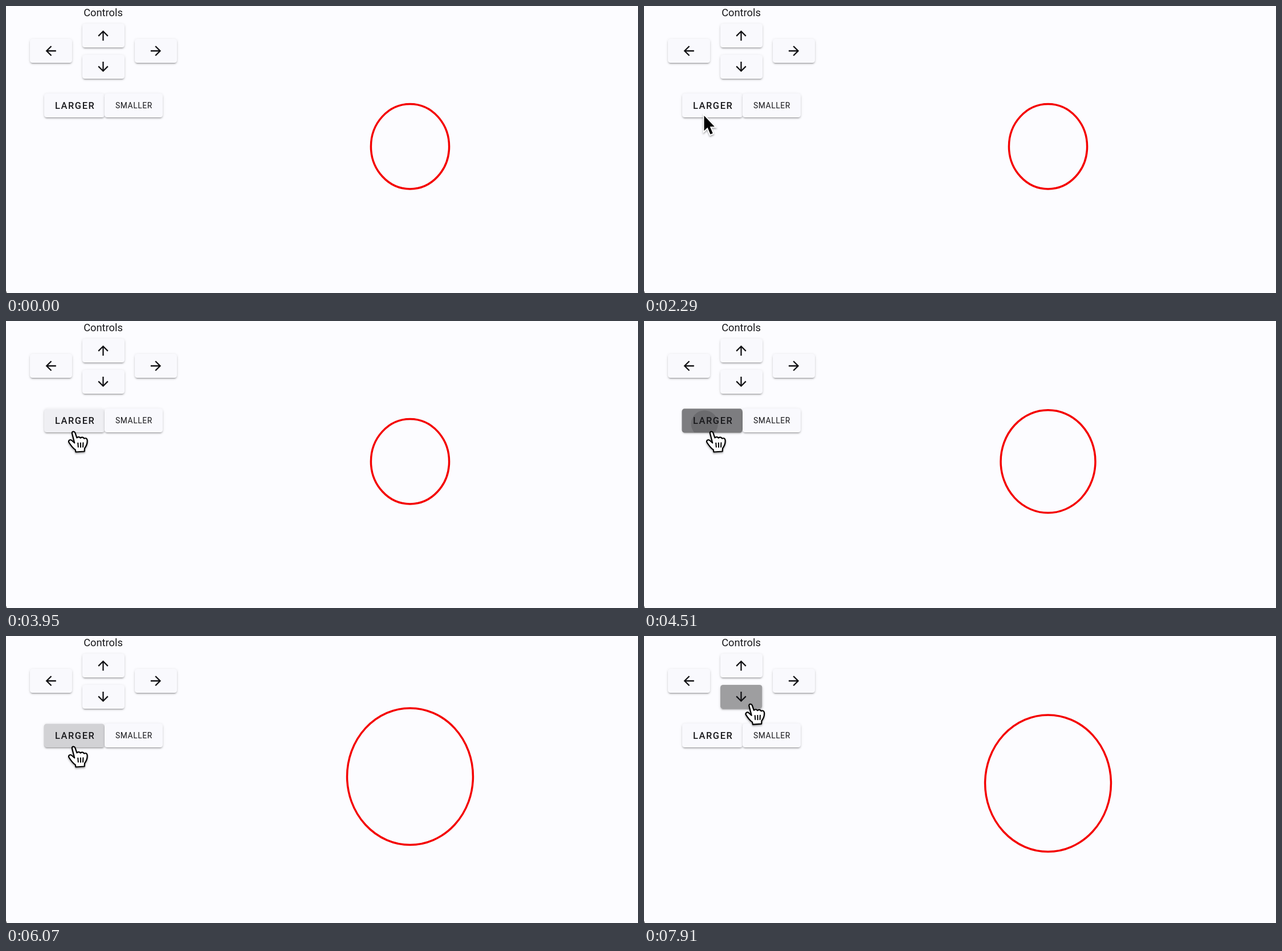
Animation of 1109 by 505 pixels, one loop 8000 ms. Source, as an HTML page:

```html
<!DOCTYPE html>
<html lang="en">
<head>
<meta charset="utf-8">
<title>Circle controls</title>
<style>
html, body { margin: 0; width: 100%; height: 100%; overflow: hidden; background: #fcfcff; }
#stage { position: absolute; left: 0; top: 0; width: 1109px; height: 505px; overflow: hidden; }
.btn {
  position: absolute; height: 42px; border-radius: 4.6px; background: #f9f9fd;
  box-shadow: 0 3.4px 1.1px -2.3px rgba(0,0,0,.2), 0 2.3px 2.3px rgba(0,0,0,.14), 0 1.1px 5.7px rgba(0,0,0,.12);
}
svg { position: absolute; left: 0; top: 0; }
text { font-family: Roboto, sans-serif; fill: #18181b; }
.cursor { filter: drop-shadow(0 2px 1.5px rgba(0,0,0,.35)); }
</style>
</head>
<body>
<div id="stage"></div>
<script>
const LOOP = 8000;
const stage = document.getElementById('stage');
const NS = 'http://www.w3.org/2000/svg';

function el(tag, attrs, parent) {
  const node = document.createElementNS(NS, tag);
  set(node, attrs);
  parent.appendChild(node);
  return node;
}
function set(node, attrs) {
  for (const key in attrs) node.setAttribute(key, attrs[key]);
}
const clamp = v => Math.max(0, Math.min(1, v));
const mix = (a, b, p) => a + (b - a) * p;
const smooth = p => p * p * (3 - 2 * p);

// cubic-bezier(0, 0, .2, 1)
function decelerate(x) {
  let lo = 0, hi = 1;
  for (let i = 0; i < 20; i++) {
    const s = (lo + hi) / 2;
    if (.6 * (1 - s) * s * s + s * s * s < x) lo = s; else hi = s;
  }
  return 3 * (1 - lo) * lo * lo + lo ** 3;
}

// Buttons: x, y, width
const boxes = {
  left: [42, 58, 74], up: [134, 31, 73.5], down: [134, 86, 73.5],
  right: [226.3, 58, 74], larger: [66.5, 154.3, 106.5], smaller: [173, 154.3, 102]
};
for (const [x, y, w] of Object.values(boxes)) {
  const div = document.createElement('div');
  div.className = 'btn';
  div.style.cssText = `left:${x}px;top:${y}px;width:${w}px`;
  stage.appendChild(div);
}

const svg = el('svg', { width: 1109, height: 505, viewBox: '0 0 1109 505' }, stage);
const defs = el('defs', {}, svg);

function overlay(name) {
  const [x, y, w] = boxes[name];
  const shape = { x, y, width: w, height: 42, rx: 4.6 };
  const clip = el('clipPath', { id: 'clip-' + name }, defs);
  el('rect', shape, clip);
  const group = el('g', { 'clip-path': `url(#clip-${name})` }, svg);
  return {
    group,
    focus: el('rect', { ...shape, opacity: 0 }, group),
    hover: el('rect', { ...shape, opacity: 0 }, group)
  };
}
const larger = overlay('larger');
const down = overlay('down');

// Each press: owner, box, start, release, pointer position
const presses = [
  [larger, 'larger', 4010, 4110, 103.6, 182],
  [larger, 'larger', 4230, 4340, 103.6, 182],
  [larger, 'larger', 4494, 4590, 103.6, 182],
  [larger, 'larger', 4880, 4990, 103.6, 182],
  [larger, 'larger', 5172, 5390, 103.6, 182],
  [down, 'down', 7530, 7640, 174, 110]
].map(([owner, name, start, release, x, y]) => {
  const [bx, by, w] = boxes[name];
  return {
    name, start, release, x, y,
    cx: bx + w / 2, cy: by + 21, r: Math.hypot(w, 42) / 2,
    node: el('circle', { opacity: 0 }, owner.group)
  };
});

const ARROW = 'M20 11V13H8L13.5 18.5L12.08 19.92L4.16 12L12.08 4.08L13.5 5.5L8 11Z';
[['left', 0], ['up', 90], ['right', 180], ['down', 270]].forEach(([name, turn]) => {
  const [x, y, w] = boxes[name];
  el('path', {
    d: ARROW, fill: '#111114',
    transform: `translate(${x + w / 2 - .3} ${y + 21}) rotate(${turn}) scale(1.15) translate(-12.08 -12)`
  }, svg);
});

function label(str, attrs) {
  el('text', attrs, svg).textContent = str;
}
label('Controls', { x: 170.5, y: 18.4, 'font-size': 18.3, 'text-anchor': 'middle' });
label('LARGER', { x: 85.9, y: 181, 'font-size': 16.4, 'font-weight': 500, 'letter-spacing': 1.6 });
label('SMALLER', { x: 192, y: 180, 'font-size': 13.8, 'letter-spacing': .6 });
el('path', { d: 'M0 501Q1 503 1.5 505H0Z', fill: '#555' }, svg);

const ring = el('ellipse', { cx: 709, cy: 247, fill: 'none', stroke: '#f40000', 'stroke-width': 3.5 }, svg);

const pointer = el('path', {
  class: 'cursor', d: 'M0 0V26.5L6 20.8L11 32.8L15.2 31L10.2 19.3H18.3Z',
  fill: '#000', stroke: '#fff', 'stroke-width': 4, 'paint-order': 'stroke'
}, svg);

const hand = el('g', { class: 'cursor' }, svg);
el('path', {
  d: 'M-2 2.5C-3 -1.5 2 -2 3.2 1.2L6.3 10C8 8 11 8 12.6 10.3C15 8.3 18 9 19 11.3C22 10 24 11 24.5 14C25.2 20 23 24.5 20 28.5L19.6 34L4.5 35L3.6 31C-1 28 -4.5 23 -7.6 18C-9.2 14.5 -5 12 -2.4 14.8L2.2 19Z',
  fill: '#fff', stroke: '#000', 'stroke-width': 2.2, 'stroke-linejoin': 'round'
}, hand);
el('path', { d: 'M8.2 18.5L8.8 27M12.8 18.2L13 27.3M17.4 18L17 27', stroke: '#000', 'stroke-width': 2, fill: 'none' }, hand);

// Pointer stops: time, x, y
const route = [
  [420, 846, 498], [1010, 447, 212], [1590, 447, 212], [1710, 440.8, 208.5],
  [2310, 104.5, 193], [2410, 104.5, 193], [3150, 110.5, 187.5], [3670, 110.5, 187.5],
  [3750, 118, 195.5], [6240, 118, 195.5], [6790, 179.8, 129.7], [7110, 186.5, 120.7]
];
function position(t) {
  let i = 0;
  while (i < route.length - 1 && t >= route[i + 1][0]) i++;
  const a = route[i], b = route[i + 1] || a;
  const p = b === a ? 0 : smooth(clamp((t - a[0]) / (b[0] - a[0])));
  return [mix(a[1], b[1], p), mix(a[2], b[2], p)];
}

function drawRipple(press, t) {
  const age = t - press.start;
  if (age < 0) return set(press.node, { opacity: 0 });
  const p = decelerate(clamp(age / 375));
  const fadeAt = Math.max(420, press.release - press.start);
  const alpha = mix(.14, .25, clamp((age - 180) / 80)) * (1 - clamp((age - fadeAt) / 450));
  set(press.node, {
    cx: mix(press.x, press.cx, p), cy: mix(press.y, press.cy, p),
    r: press.r * mix(.3, 1, p), opacity: alpha
  });
}

function fade(t, from, to) {
  return clamp((t - from) / 150) * (1 - clamp((t - to) / 150));
}

function draw(t) {
  presses.forEach(press => drawRipple(press, t));
  const done = name => presses.filter(p => p.name === name && t >= p.release).length;
  const scale = 1.1 ** done('larger');
  set(ring, { rx: 68.6 * scale, ry: 74.7 * scale, cy: 247.2 + 12 * done('down') });

  set(larger.focus, { opacity: .12 * fade(t, 4010, 7530) });
  set(larger.hover, { opacity: .04 * fade(t, 3700, 6450) });
  set(down.focus, { opacity: .12 * fade(t, 7530, LOOP) });
  set(down.hover, { opacity: .04 * fade(t, 6900, LOOP) });

  const [x, y] = position(t);
  const place = `translate(${x} ${y})`;
  const isHand = t >= 3710;
  set(pointer, { transform: place, visibility: t >= 420 && !isHand ? 'visible' : 'hidden' });
  set(hand, { transform: place, visibility: isHand ? 'visible' : 'hidden' });
}

const begin = performance.now();
function tick() {
  draw((performance.now() - begin) % LOOP);
  requestAnimationFrame(tick);
}
draw(0);
requestAnimationFrame(tick);
</script>
</body>
</html>
```
